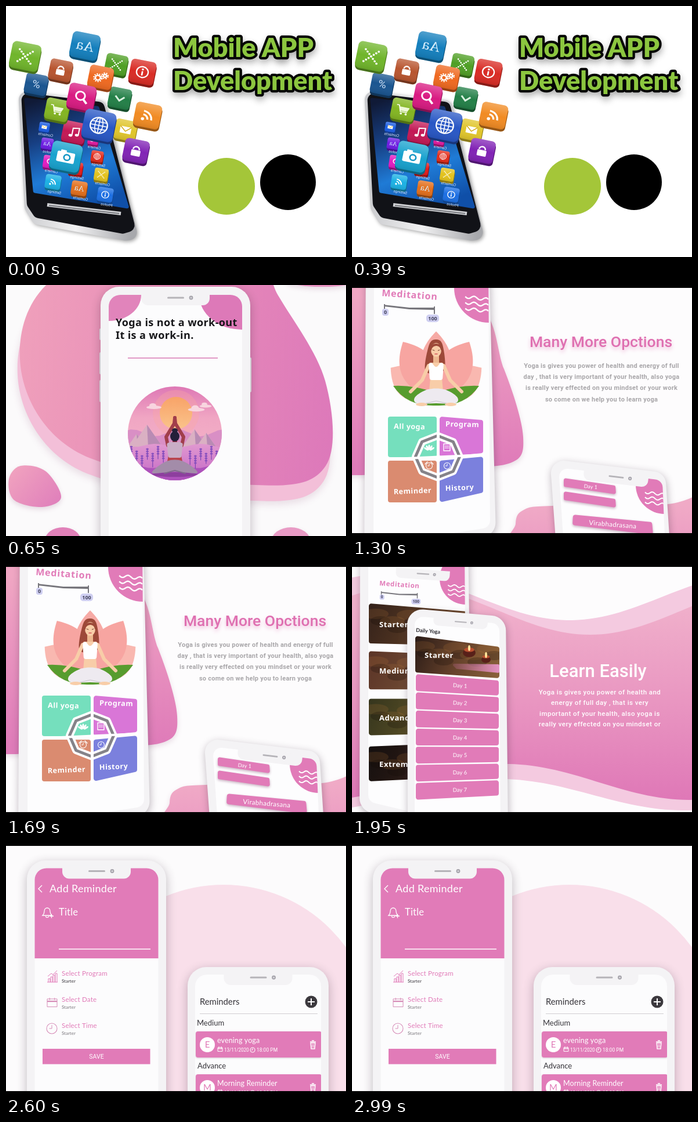
Animation of 586 by 433 pixels, one loop 3250 ms. Source, as an HTML page with a canvas:

```html
<!DOCTYPE html>
<html lang="en">
<head>
<meta charset="utf-8">
<title>Mobile app slides</title>
<style>
html, body { margin: 0; width: 100%; height: 100%; overflow: hidden; background: #fff; }
canvas { display: block; }
</style>
</head>
<body>
<canvas id="stage" width="586" height="433"></canvas>
<script>
const c = document.getElementById('stage').getContext('2d');
const W = 586, H = 433, HOLD = 650;
const PINK = '#e17bb8', SHELL = '#f4f3f5', TAU = Math.PI * 2;

// --- helpers ---
const times = (n, fn) => Array.from({ length: n }, (_, i) => fn(i));
function grad(x0, y0, x1, y1, ...colors) {
  const g = c.createLinearGradient(x0, y0, x1, y1);
  colors.forEach((k, i) => g.addColorStop(i / (colors.length - 1), k));
  return g;
}
function local(x, y, angle, draw, sx = 1, sy = sx) {
  c.save(); c.translate(x, y); c.rotate(angle); c.scale(sx, sy); draw(); c.restore();
}
function shaded(blur, color, dx, dy, draw) {
  c.save();
  c.shadowBlur = blur; c.shadowColor = color; c.shadowOffsetX = dx; c.shadowOffsetY = dy;
  draw(); c.restore();
}
function fill(paint) { c.fillStyle = paint; c.fill(); }
function page(paint) { c.fillStyle = paint; c.fillRect(0, 0, W, H); }
function box(x, y, w, h, r, paint) { c.beginPath(); c.roundRect(x, y, w, h, r); fill(paint); }
function disc(x, y, r, paint, ry = r) { c.beginPath(); c.ellipse(x, y, r, ry, 0, 0, TAU); fill(paint); }
function ring(x, y, r, color, w = 1, from = 0, to = TAU) {
  c.beginPath(); c.arc(x, y, r, from, to);
  c.strokeStyle = color; c.lineWidth = w; c.stroke();
}
function line(pts, color, w = 1, close) {
  c.beginPath(); pts.forEach(p => c.lineTo(...p));
  if (close) c.closePath();
  c.strokeStyle = color; c.lineWidth = w; c.stroke();
}
function tracePoly(pts, r) {
  const n = pts.length, [a, b] = [pts[n - 1], pts[0]];
  c.beginPath();
  c.moveTo((a[0] + b[0]) / 2, (a[1] + b[1]) / 2);
  pts.forEach((p, i) => c.arcTo(...p, ...pts[(i + 1) % n], r));
  c.closePath();
}
function poly(pts, r, paint) { tracePoly(pts, r); fill(paint); }
function blob(pts, paint) {
  const n = pts.length, at = i => pts[(i + n) % n];
  c.beginPath(); c.moveTo(...pts[0]);
  for (let i = 0; i < n; i++) {
    const [p, q, r, s] = [at(i - 1), at(i), at(i + 1), at(i + 2)];
    c.bezierCurveTo(q[0] + (r[0] - p[0]) / 6, q[1] + (r[1] - p[1]) / 6,
      r[0] - (s[0] - q[0]) / 6, r[1] - (s[1] - q[1]) / 6, r[0], r[1]);
  }
  fill(paint);
}
function text(s, x, y, font, color, align = 'left', spacing = 0) {
  c.font = font; c.fillStyle = color; c.textAlign = align;
  c.letterSpacing = spacing + 'px'; c.fillText(s, x, y);
}
function paragraph(rows, x, y, step, font, color, spacing) {
  rows.forEach((s, i) => text(s, x, y + i * step, font, color, 'center', spacing));
}
function bars() { c.fillStyle = '#000'; c.fillRect(0, 0, W, 5); c.fillRect(0, 428, W, 5); }

// --- phone parts ---
function notch(x, y, angle, half, k = 1) {
  local(x, y, angle, () => {
    box(-half, -10, half * 2, 23, [0, 0, 12, 12], SHELL);
    box(-14, -1.5, 29, 3, 1.5, '#b5b3b8');
    disc(27, 0, 3.4, '#a5a3aa'); disc(27, 0, 1.6, '#d5d4da');
  }, k);
}
function phone(x, y, w, bezel, screen) {
  shaded(18, 'rgba(60,40,60,.32)', 0, 5, () => box(x, y, w, 520, 32, SHELL));
  c.save();
  c.beginPath(); c.roundRect(x + bezel, y + bezel, w - bezel * 2, 520, 20); c.clip();
  page('#fcfcfd'); screen(); c.restore();
  notch(x + w / 2, y + bezel + 5, 0, 59);
}
function tiltedPhone(outer, inner, r, screen) {
  shaded(14, 'rgba(60,40,60,.35)', 1, 4, () => poly(outer, r, SHELL));
  c.save(); tracePoly(inner, 14); c.clip();
  page('#fdfdfe'); screen(); c.restore();
}
function rippleCorner(x, y, r) {
  disc(x, y, r, PINK);
  const w = r * .68;
  for (let i = 0; i < 3; i++) {
    const wave = times(Math.ceil(w), t => [x - w + t, y + r * .25 + i * r * .17 + t * .13 + Math.sin(t / w * 12.5) * w * .06]);
    line(wave, '#fff', w / 17);
  }
}

// --- slide 1: handset with floating icons ---
const glyphs = {
  dots() { for (let i = -3; i <= 3; i++) { disc(i * 3.6, i * 3.6, 1.8, '#fff'); disc(i * 3.6, -i * 3.6, 1.8, '#fff'); } },
  letters() { local(0, 8, 0, () => text('Aa', 0, 0, '24px "Noto Serif", serif', '#d5ecfa', 'center'), -1, 1); },
  percent() { text('%', 0, 8, '24px Roboto, sans-serif', '#cfe0f5', 'center'); },
  lock() { box(-9, -2, 18, 13, 2, '#fff'); ring(0, -3, 6, '#fff', 3, Math.PI, TAU); },
  gears() {
    for (const [x, y, r] of [[-5, 2, 6], [8, -5, 4]]) {
      c.setLineDash([2.4, 2.4]); ring(x, y, r + 2, '#fff', 3); c.setLineDash([]);
      ring(x, y, r - 1, '#fff', 3);
    }
  },
  info() { ring(0, 0, 11, '#fff', 2.5); box(-1.5, -2, 3, 9, 1, '#fff'); disc(0, -5.5, 2, '#fff'); },
  search() { ring(-2, -2, 8, '#fff', 3); line([[4, 4], [11, 11]], '#fff', 4); },
  down() { line([[-10, -4], [0, 6], [10, -4]], '#d9f0df', 4); },
  cart() {
    line([[-14, -9], [-9, -9], [-5, 5], [9, 5]], '#fff', 2);
    poly([[-8, -6], [13, -6], [9, 3], [-5, 3]], 1, '#eef8d8');
    disc(-3, 9, 2.2, '#fff'); disc(7, 9, 2.2, '#fff');
  },
  globe() {
    ring(0, 0, 13, '#fff', 2);
    for (const y of [-6, 0, 6]) { const h = Math.sqrt(169 - y * y); line([[-h, y], [h, y]], '#fff', 1.4); }
    line([[0, -13], [0, 13]], '#fff', 1.4);
    c.beginPath(); c.ellipse(0, 0, 6, 13, 0, 0, TAU); c.stroke();
  },
  mail() { box(-12, -8, 24, 16, 1, '#fff'); line([[-12, -8], [0, 3], [12, -8]], '#d3a90c', 2); },
  feed() { disc(-8, 8, 3, '#fff'); for (const r of [9, 16]) ring(-8, 8, r, '#fff', 3.5, -Math.PI / 2, 0); },
  music() { disc(-6, 8, 4, '#fff', 3); disc(7, 5, 4, '#fff', 3); line([[-3, 8], [-3, -9], [10, -11], [10, 5]], '#fff', 2.5); },
  camera() { box(-14, -8, 28, 18, 2, '#fff'); box(-9, -11, 9, 4, 1, '#fff'); disc(2, 1, 6, '#1496c4'); disc(2, 1, 3.5, '#fff'); },
};
function cube(x, y, w, tilt, color, glyph) {
  local(x, y, tilt, () => {
    const h = w / 2, r = w * .16;
    box(-h + 1, -h + 4, w, w, r, color);
    box(-h + 1, -h + 4, w, w, r, 'rgba(0,0,0,.38)');
    box(-h, -h, w, w, r, color);
    box(-h, -h, w, w, r, grad(0, -h, 0, h, 'rgba(255,255,255,.26)', 'rgba(255,255,255,0)', 'rgba(0,0,0,.1)'));
    local(0, 0, 0, glyphs[glyph], w / 48);
  }, 1, .92);
}
// centre, colour, glyph; nearer icons come later and grow
const floating = [
  [190, 101, '#4f9f25', 'dots'], [206, 214, '#e0c52b', 'mail'], [196, 159, '#237f47', 'down'], [52, 135, '#1a5590', 'percent'],
  [94, 111, '#b8552f', 'lock'], [117, 218, '#c31855', 'music'], [88, 179, '#83b522', 'cart'], [163, 123, '#ef6920', 'gears'],
  [224, 250, '#8123b5', 'lock'], [235, 114, '#d92c25', 'info'], [244, 189, '#f18b23', 'feed'], [130, 157, '#d91b82', 'search'],
  [136, 69, '#147fbd', 'letters'], [33, 87, '#70b52b', 'dots'], [103, 260, '#18a2ce', 'camera'], [160, 206, '#2857c5', 'globe'],
];
function handset() {
  shaded(6, 'rgba(0,0,0,.35)', 2, 2, () =>
    poly([[21, 146], [170, 163], [229, 402], [205, 405], [48, 376], [32, 350]], 14, grad(25, 0, 215, 0, '#c9cacd', '#f1f1f2', '#a7a8ac')));
  poly([[26, 149], [168, 166], [224, 386], [202, 393], [50, 365], [36, 344]], 12, '#111217');
  poly([[31, 158], [160, 173], [213, 350], [47, 322]], 3, grad(60, 160, 130, 350, '#101a37', '#173f83', '#1f7bd6', '#0f4fa8'));
  line([[71, 343], [198, 358]], '#d2d3d6', 6);
  line([[74, 344], [195, 358]], '#77797e', 2);
  const names = Object.keys(glyphs), labels = ['Contacts', 'Photos', 'Camera', 'Settings'];
  for (let row = 0; row < 4; row++) for (let col = 0; col < 3; col++) {
    const x = 66 + row * 5 + col * (42 + row), y = 209 + row * 27 + row * row * 1.5 + col * 11, size = 18 + row * 3;
    const hue = row === 3 ? (195 + col * 190) % 360 : 220 + row * 45 + col * 50;
    cube(x, y, size, .16, `hsl(${hue} 78% 50%)`, names[(row * 5 + col * 4 + 10) % names.length]);
    local(x + 2, y + size * .5 + 6, .16, () => text(labels[(row + col) % 4], 0, 0, '6.5px Roboto, sans-serif', '#dce8f8', 'center'), -1, 1);
  }
}
function titleSlide() {
  page('#fff');
  handset();
  floating.forEach(([x, y, color, glyph], i) => cube(x, y, 38 + i * i * .075, .2, color, glyph));
  const font = '900 45px Lato, sans-serif';
  const rows = [['Mobile APP', 88], ['Development', 145]];
  c.font = font; c.textAlign = 'left'; c.letterSpacing = '0px'; c.lineJoin = 'round';
  c.strokeStyle = '#050505'; c.lineWidth = 8.5;
  shaded(12, 'rgba(0,0,0,.3)', 1, 6, () => rows.forEach(([s, y]) => c.strokeText(s, 288, y)));
  rows.forEach(([s, y]) => text(s, 288, y, font, '#8cc63f'));
  disc(380, 311, 49, '#a4c639');
  disc(486, 304, 48, '#000');
}

// --- slide 2: welcome screen ---
function sitter() {
  disc(291, 327, 40, 'rgba(110,45,130,.5)', 4);
  for (const s of [-1, 1]) line([[291 + s * 12, 277], [291 + s * 15, 262], [291 + s, 239], [291, 229]], '#a13e4b', 6);
  box(287, 264, 8, 13, 2, '#8f3346');
  poly([[277, 273], [305, 273], [301, 289], [305, 309], [277, 309], [281, 289]], 4, '#b9444c');
  poly([[277, 273], [284, 271], [298, 271], [305, 273], [302, 298], [280, 298]], 3, '#c9adc6');
  blob([[277, 304], [305, 304], [330, 324], [291, 322], [252, 324]], '#a38ca9');
  line([[273, 325], [291, 320], [309, 325]], '#80698c', 2);
  disc(291, 261, 8, '#241f39', 9); disc(291, 251, 5, '#241f39', 4);
}
function hills(y, amp, paint) {
  poly([[205, 345], ...times(18, i => [205 + i * 10, y + amp * Math.sin(i * .8 + y)]), [380, 345]], 3, paint);
}
function scenery() {
  c.save();
  c.beginPath(); c.arc(291, 256, 81, 0, TAU); c.clip();
  page(grad(0, 175, 0, 337, '#de78b5', '#f0a6c3', '#f3b0c7', '#c879ca'));
  disc(293, 221, 40, 'rgba(248,166,160,.35)');
  disc(293, 221, 28, grad(0, 193, 0, 249, '#f8a368', '#fac38b'));
  for (const [x, y, s] of [[255, 211, 1], [328, 215, 1.1], [344, 209, .8]]) {
    disc(x, y, 13 * s, '#f8d5df', 3 * s); disc(x - 2, y - 3, 6 * s, '#f8d5df', 4 * s);
  }
  hills(255, 6, '#d98fc5');
  for (const [x, h] of [[225, 22], [243, 38], [325, 30], [345, 24]]) {
    poly([[x, 279 - h], [x + h * .7, 279], [x - h * .7, 279]], 0, '#dab0c3');
    poly([[x, 279 - h], [x + h * .7, 279], [x + 2, 279]], 0, '#b98bb4');
  }
  hills(277, 3, grad(0, 272, 0, 337, '#e29ad0', '#c267c6'));
  hills(312, 4, '#ad52bb');
  c.lineJoin = c.lineCap = 'round';
  for (let i = 0; i < 17; i++) {
    const x = 216 + i * 9.2, y = 287 + (i * 7 % 5) * 4;
    if (x > 272 && x < 310) continue;
    line([[x, y + 9 + i * 5 % 7], [x, y - 8]], '#7b45b5', 1.2);
    for (let k = 0; k < 4; k++) disc(x, y - 8 + k * 4, 2.4, '#8750be', 1.5);
  }
  sitter();
  c.restore();
}
function welcomeSlide() {
  page('#fbfafb');
  const big = () => blob([[95, -20], [25, 140], [130, 292], [430, 345], [551, 312], [550, 165], [469, 18], [400, -90]],
    c.fillStyle);
  shaded(14, 'rgba(150,90,130,.2)', 0, 5, () => local(-4, 27, 0, () => { c.fillStyle = '#f3bfd8'; big(); }));
  c.fillStyle = grad(20, 150, 565, 220, '#ef9fbb', '#e78bb8', '#dd79ba'); big();
  shaded(8, 'rgba(150,90,130,.22)', 0, 4, () => {
    blob([[25, 312], [68, 321], [95, 366], [62, 383], [14, 371], [5, 335]], grad(5, 310, 90, 384, '#f2a5bf', '#df7ebb'));
    disc(98, 441, 31, '#e181b9', 23); disc(491, 443, 34, '#e99bc5', 25); disc(545, -8, 63, '#e58fbe', 11);
  });
  for (const [x, y, h] of [[161, 75, 20], [161, 116, 38], [161, 164, 38], [418, 125, 60]]) box(x, y, 5, h, 2, '#e6e4e8');
  phone(163, 3, 258, 14, () => {
    disc(178, 17, 55, '#e184bb', 45);
    disc(407, 17, 74, '#dd79b8', 60);
  });
  const font = 'bold 18px "Noto Sans", sans-serif';
  text('Yoga is not a work-out', 189, 71, font, '#17171a', 'left', .4);
  text('It is a work-in.', 189, 93, font, '#17171a', 'left', .4);
  line([[210, 126], [365, 126]], '#d878b4', 1.6);
  scenery();
}

// --- slide 3: options ---
function meditation(x, y, k) {
  local(x, y, .07, () => text('Meditation', 0, 0, 'bold 16px "Noto Sans", sans-serif', PINK, 'left', .8), k);
  local(x, y, 0, () => {
    poly([[4, 15], [48, 20], [92, 20], [92, 24], [48, 23], [4, 18]], 1, '#77767c');
    line([[5, 14], [5, 25]], '#77767c', 2); line([[91, 18], [91, 31]], '#77767c', 2);
    box(1, 22, 11, 12, 4, '#cfcff1'); box(77, 32, 22, 13, 5, '#cfcff1');
    const font = 'bold 9px "Noto Sans", sans-serif';
    text('0', 6.5, 31, font, '#44445e', 'center'); text('100', 88, 42, font, '#44445e', 'center');
  }, k);
}
function yogi() {
  const petal = (angle, len, w, color) => local(145, 200, angle, () => {
    c.beginPath(); c.moveTo(0, 0);
    c.bezierCurveTo(-w, -len * .45, -w * .7, -len * .75, 0, -len);
    c.bezierCurveTo(w * .7, -len * .75, w, -len * .45, 0, 0); fill(color);
  });
  const skin = '#f8cda8', hair = '#9d4939';
  for (const s of [-1, 1]) petal(s * .94, 97, 44, '#f9b8b0');
  petal(0, 120, 42, '#f6aaa5');
  for (const s of [-1, 1]) {
    petal(s * .51, 117, 46, '#f7a5a1');
    c.beginPath(); c.moveTo(145 + s * 74, 174);
    c.quadraticCurveTo(145 + s * 40, 172, 145, 186); c.lineTo(145, 208);
    c.quadraticCurveTo(145 + s * 50, 210, 145 + s * 74, 174); fill('#579c2e');
  }
  blob([[133, 103], [145, 94], [156, 103], [160, 143], [145, 153], [126, 146]], hair);
  c.lineJoin = c.lineCap = 'round';
  for (const s of [-1, 1]) line([[145 + s * 13, 139], [145 + s * 24, 164], [145 + s * 44, 184]], skin, 6);
  box(140, 120, 10, 17, 3, '#edb890');
  poly([[131, 134], [159, 134], [155, 160], [157, 184], [133, 184], [135, 160]], 4, skin);
  poly([[132, 136], [137, 133], [145, 144], [153, 133], [158, 136], [156, 164], [134, 164]], 4, '#fff');
  disc(145, 112, 9, skin, 12);
  ring(145, 113, 10, hair, 4, Math.PI * 1.05, TAU * .97);
  for (const s of [-1, 1]) line([[145 + s * 3, 113], [145 + s * 6, 112]], '#71412f');
  line([[143, 119], [147, 119]], '#d4575b', 1.5);
  blob([[131, 180], [159, 180], [181, 193], [178, 204], [145, 204], [112, 204], [109, 193]], '#eeeaf0');
  line([[124, 205], [145, 200], [167, 205]], '#c8c2cd');
  for (const s of [-1, 1]) disc(145 + s * 25, 206, 10, skin, 3);
}
function menu() {
  const tiles = [['All yoga', '#75dfbd', 248], ['Program', '#d976d7', 244], ['Reminder', '#da8b70', 361], ['History', '#7b80dd', 355]];
  tiles.forEach(([, color], i) => {
    const col = i % 2, low = i > 1, [x0, x1] = col ? [151, 226] : [62, 146];
    const mid = low ? 303 : 297, edge = low ? 375 : 227, slope = low ? -17 : 6;
    poly([[x0, mid], [x1, mid - col * 7], [x1, edge + col * slope], [x0, edge]], 4, color);
  });
  const octagon = times(8, i => [147.5 + 38 * Math.cos(i * TAU / 8), 296 + 36 * Math.sin(i * TAU / 8)]);
  line(octagon, '#fff', 13, true); line(octagon, '#858389', 5, true);
  line([[148.5, 226], [148.5, 375]], '#fff', 5); line([[62, 300.5], [226, 293]], '#fff', 4);
  tiles.forEach(([s, , y], i) => local(i % 2 ? 161 : 72, y, i > 1 ? -.04 : .02, () =>
    text(s, 0, 0, 'bold 12.6px "Noto Sans", sans-serif', '#fff', 'left', .5)));
  for (const a of [-1, -.5, 0, .5, 1]) local(133, 286, a, () => disc(0, -6, 1.6, '#fff', 4.5));
  line([[158, 274], [169, 274], [169, 286], [158, 286]], '#fff', 1.4, true);
  for (const y of [278, 281]) line([[160, y], [167, y]], '#fff');
  for (const x of [133, 164]) clock(x, 312, 5.5, '#fff');
  for (const s of [-1, 1]) line([[133 + s * 7, 309], [133 + s * 3, 305]], '#fff', 1.4);
}
function optionsSlide() {
  page('#fdfcfd');
  shaded(10, 'rgba(150,90,130,.2)', 0, 4, () => {
    blob([[-60, -30], [200, 20], [262, 145], [295, 262], [270, 308], [150, 311], [-60, 300]], grad(0, 20, 0, 312, '#f0a6c3', '#df7bb9'));
    blob([[292, 470], [282, 412], [296, 388], [345, 381], [545, 378], [640, 352], [640, 470]], grad(0, 380, 0, 430, '#f0aac6', '#eda0c4'));
  });
  tiltedPhone([[24, -50], [236, -50], [248, 431], [21, 475]], [[38, -50], [235, -50], [238, 418], [37, 450]], 26, () => {
    rippleCorner(236, 5, 60);
    meditation(51, 19, 1);
    yogi(); menu();
  });
  tiltedPhone([[341, 300], [540, 324], [550, 480], [354, 480]], [[356, 315], [535, 337], [541, 480], [367, 480]], 22, () => {
    rippleCorner(539, 345, 50);
    shaded(4, 'rgba(120,60,100,.4)', 0, 2, () => {
      for (const y of [333, 356]) poly([[365, y], [454, y + 13], [455, y + 28], [365, y + 15]], 3, PINK);
      poly([[381, 396], [517, 409], [519, 431], [380, 414]], 4, PINK);
    });
    local(411, 351, .08, () => text('Day 1', 0, 0, '9px Lato, sans-serif', '#fff', 'center'));
    local(449, 417, .08, () => text('Virabhadrasana', 0, 0, '11.5px Lato, sans-serif', '#fff', 'center', .3));
  });
  notch(455, 331, .12, 62, .9);
  shaded(7, 'rgba(225,123,184,.5)', 0, 4, () => text('Many More Opctions', 429, 107, '500 26.5px Roboto, sans-serif', '#df70b1', 'center'));
  paragraph(['Yoga is gives you power of health and energy of full', 'day , that is very important of your health, also yoga',
    'is really very effected on you mindset or your work', 'so come on we help you to learn yoga'], 430, 143, 19.2, 'bold 11px Roboto, sans-serif', '#a8a6a9', .25);
  bars();
}

// --- slide 4: lessons ---
function candleCard(pts, paint, label, x, y) {
  c.save(); tracePoly(pts, 4); c.clip();
  page(paint);
  for (let i = 0; i < 5; i++) {
    const px = pts[0][0] + 12 + i * 29, py = pts[0][1] + 18 + i * 13 % 24;
    disc(px, py, 22, 'rgba(190,125,60,.16)', 9); disc(px + 8, py + 12, 17, 'rgba(20,10,8,.24)', 8);
  }
  c.restore();
  text(label, x, y, 'bold 13px "Noto Sans", sans-serif', '#fff', 'left', .6);
}
const swell = (mid, amp, crest) => times(60, i => [i * 10, mid + amp * Math.cos((i * 10 - crest) / 101)]);
function band(top, bottom, paint) { poly([...top, ...bottom.reverse()], 0, paint); }
function lessonsSlide() {
  page('#fdfcfd');
  band(swell(57, 40, 375), swell(398, -27, 255), '#f4cae0');
  band(swell(80, 42, 410), swell(376, -31, 265), grad(0, 70, 0, 405, '#f0b0cb', '#e996c1', '#df78b7'));
  tiltedPhone([[14, -50], [200, -50], [207, 450], [13, 427]], [[28, -50], [194, -50], [197, 450], [28, 410]], 26, () => {
    rippleCorner(196, 25, 45);
    meditation(47, 37, .72);
    [['Starter', '#33211a', '#6e4829'], ['Medium', '#5b3427', '#7d5b3b'], ['Advance', '#35351d', '#71602b'], ['Extreme', '#15100f', '#3b2118']]
      .forEach(([s, a, b], i) => {
        const y = 68 + i * 82.3, right = y + 14 - i * 7;
        candleCard([[29, y], [200, right], [200, right + 59], [29, y + 69 - i * 3]], grad(29, y, 180, y + 70, a, b), s, 47, y + 41 - i * 2);
      });
  });
  notch(122, 17, .07, 62, .75);
  tiltedPhone([[95, 76], [265, 91], [269, 455], [96, 455]], [[108, 90], [254, 103], [256, 455], [108, 455]], 26, () => {
    local(110, 117, .08, () => text('Daily Yoga', 0, 0, 'bold 9px Lato, sans-serif', '#252329'));
    candleCard([[109, 124], [254, 143], [254, 197], [109, 187]], grad(109, 130, 254, 195, '#2b1c17', '#65412b', '#8b633b'), 'Starter', 125, 162);
    for (const [x, y, r] of [[202, 148, 11], [231, 160, 8]]) {
      disc(x, y + 5, r, '#582019', r * .7); disc(x, y, r * .8, '#bb5030', r * .35); disc(x, y - 3, 2, '#ffe49a', 5);
    }
    poly([[171, 172], [254, 173], [254, 188], [180, 181]], 2, grad(171, 0, 254, 0, 'rgba(225,123,184,.15)', '#e494c4'));
    for (let i = 0; i < 7; i++) {
      const l = 190 + i * 31.3, r = 201 + i * 28.7;
      poly([[110, l], [253, r], [253, r + 26], [110, l + 29]], 4, PINK);
      local(186, (l + r) / 2 + 17.5, .06 - i * .014, () => text('Day ' + (i + 1), 0, 0, '9.5px Lato, sans-serif', '#fff', 'center'));
    }
  });
  notch(187, 100, .08, 65, .72);
  text('Learn Easily', 424, 195, '500 31px Roboto, sans-serif', '#fff', 'center');
  paragraph(['Yoga is gives you power of health and', 'energy of full day , that is very', 'important of your health, also yoga is', 'really very effected on you mindset or'],
    427, 225, 18.4, '500 11.5px Roboto, sans-serif', '#fff', .45);
  bars();
}

// --- slide 5: reminders ---
function clock(x, y, r, color) {
  ring(x, y, r, color, 1.1); line([[x, y - r * .65], [x, y], [x - r * .5, y]], color, 1);
}
function calendar(x, y, w, color) {
  const h = w * .8;
  line([[x, y], [x + w, y], [x + w, y + h], [x, y + h]], color, 1, true);
  line([[x, y + h * .3], [x + w, y + h * .3]], color, w / 8);
  for (const k of [.25, .75]) line([[x + w * k, y - 2], [x + w * k, y + 2]], color, 1);
}
function plus(x, y, r, w) {
  line([[x - r, y], [x + r, y]], '#fff', w); line([[x, y - r], [x, y + r]], '#fff', w);
}
function reminderCard(y, name) {
  shaded(3, 'rgba(120,50,100,.3)', 0, 1, () => box(327, y, 217, 45, 4, PINK));
  disc(347, y + 23, 13, '#fff');
  text(name[0].toUpperCase(), 347, y + 28, '15px Lato, sans-serif', PINK, 'center');
  text(name, 364, y + 20, '12.5px Lato, sans-serif', '#fff', 'left', .1);
  calendar(365, y + 28, 8, '#fff'); clock(425, y + 32, 4, '#fff');
  text('13/11/2020', 376, y + 35, '8.2px Roboto, sans-serif', '#fff', 'left', -.1);
  text('18:00 PM', 432, y + 35, '8.5px Roboto, sans-serif', '#fff');
  line([[524, y + 18], [534, y + 18]], '#fff', 1.5); line([[527, y + 16], [531, y + 16]], '#fff', 1.5);
  line([[525, y + 20], [533, y + 20], [532, y + 30], [526, y + 30]], '#fff', 1.4, true);
  for (const x of [527.7, 530.3]) line([[x, y + 22], [x, y + 28]], '#fff', 1);
}
function bell() {
  c.beginPath(); c.moveTo(63, 125); c.quadraticCurveTo(66, 122, 66, 118);
  c.bezierCurveTo(66, 110, 76, 110, 76, 118); c.quadraticCurveTo(76, 122, 79, 125);
  c.closePath(); c.strokeStyle = '#fff'; c.lineWidth = 1.3; c.stroke();
  ring(71, 126, 2.5, '#fff', 1.2, 0, Math.PI);
  plus(78.5, 126, 3.5, 1.3);
}
function remindersSlide() {
  page('#fcfbfc');
  disc(375, 332, 260, '#f9dfea');
  phone(36, 30, 240, 13.5, () => {
    c.fillStyle = PINK; c.fillRect(36, 30, 240, 169);
    line([[62, 73], [56, 79], [62, 85]], '#fff', 1.4);
    text('Add Reminder', 75, 85, '18px Lato, sans-serif', '#fff', 'left', .3);
    text('Title', 91, 125, '16.5px Lato, sans-serif', '#fff', 'left', .2);
    bell();
    line([[91, 183], [249, 183]], '#fff', 1.5);
    ['Program', 'Date', 'Time'].forEach((s, i) => {
      text('Select ' + s, 96, 229 + i * 45, '11.5px Lato, sans-serif', PINK, 'left', .2);
      text('Starter', 96, 241 + i * 45, 'bold 7.8px Lato, sans-serif', i ? '#99969b' : '#67646a');
    });
    for (let i = 0; i < 4; i++) line([[73 + i * 4, 240], [73 + i * 4, 234 - i * 3], [76 + i * 4, 234 - i * 3], [76 + i * 4, 240]], PINK, 1);
    line([[72, 230], [78, 225], [81, 227], [88, 220]], PINK, 1); line([[71, 240], [89, 240]], PINK, 1);
    calendar(71, 269, 17, '#d68cb7'); clock(79, 320, 9, '#d68cb7');
    c.fillStyle = PINK; c.fillRect(63, 355, 185.5, 26.5);
    text('SAVE', 156, 372, '10.5px Roboto, sans-serif', '#fff', 'center');
  });
  phone(313, 214, 243, 13, () => {
    text('Reminders', 334, 279, '14.8px Lato, sans-serif', '#343238');
    disc(526, 274, 10.5, '#3c393e');
    plus(526, 274, 6, 2);
    line([[334, 294.5], [537, 294.5]], '#d0ced1');
    text('Medium', 329, 315, '13px Lato, sans-serif', '#343238');
    reminderCard(325, 'evening yoga');
    text('Advance', 330, 389, '13px Lato, sans-serif', '#343238');
    reminderCard(399, 'Morning Reminder');
  });
  bars();
}

const slides = [titleSlide, welcomeSlide, optionsSlide, lessonsSlide, remindersSlide];
const start = performance.now();
function frame() {
  const index = Math.floor((performance.now() - start) / HOLD) % slides.length;
  c.lineCap = 'butt'; c.lineJoin = 'miter';
  slides[index]();
  requestAnimationFrame(frame);
}
frame();
</script>
</body>
</html>
```
